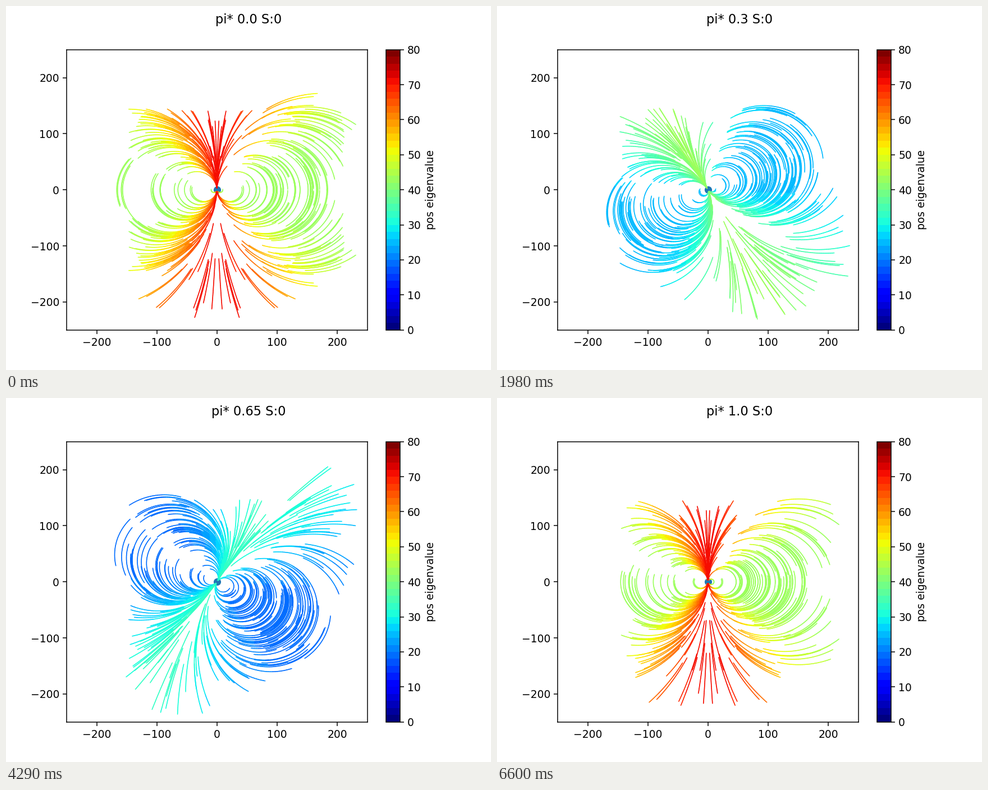
Write a matplotlib script that moves like this. It is 864 by 648 pixels and loops after 6.93 s.

```python
import numpy as np
import matplotlib.pyplot as plt
from matplotlib.animation import FuncAnimation
from matplotlib.cm import ScalarMappable
from matplotlib.collections import LineCollection
from matplotlib.colors import Normalize

FRAMES, INTERVAL = 21, 330
SEEDS = 92           # per quadrant
STEPS, STRIDE = 90, 3
CORE = 4.0           # lines stop this close to the origin


def tilt(pos, turn):
    """Angle of the field axis from the vertical at each position."""
    if abs(turn - 0.5) < 1e-9:
        above = pos[:, 1] > pos[:, 0]
        return np.where(above, np.pi / 4, -np.pi / 4)
    return np.full(len(pos), (turn if turn < 0.5 else turn - 1) * np.pi / 2)


def direction(pos, turn):
    """Unit vector of the dipole-like line field."""
    theta = np.arctan2(pos[:, 1], pos[:, 0])
    rel = theta - tilt(pos, turn)
    s, c = np.sin(rel), np.cos(rel)
    radial, around = -(1 + 0.2 * s**4) * s, c
    ct, st = np.cos(theta), np.sin(theta)
    v = np.stack([radial * ct - around * st, radial * st + around * ct], axis=1)
    return v / np.linalg.norm(v, axis=1, keepdims=True)


def aligned(v, ref):
    return np.where((v * ref).sum(axis=1, keepdims=True) < 0, -v, v)


def eigenvalue(pos, turn):
    s = np.sin(np.arctan2(pos[:, 1], pos[:, 0]) - tilt(pos, turn))
    return abs(np.cos(turn * np.pi)) * (42.5 + 29.5 * s**4)


def seeds(i):
    rng = np.random.default_rng(100 + i)
    quad = rng.uniform(1, 147, (SEEDS, 2))
    return np.concatenate([quad * (sx, sy) for sx in (1, -1) for sy in (1, -1)])


def trace(i):
    """Segments of all lines and the value at each one."""
    turn = i / (FRAMES - 1)
    pos = seeds(i)
    v = direction(pos, turn)
    # steep lines start downwards, shallow ones to the right
    steep = np.abs(v[:, 1]) > np.abs(v[:, 0])
    flip = np.where(steep, v[:, 1] > 0, v[:, 0] < 0)
    v[flip] *= -1

    path = [pos]
    live = np.ones((len(pos), 1), bool)
    for step in range(1, STEPS + 1):
        v = aligned(direction(pos, turn), v)
        mid = aligned(direction(pos + v / 2, turn), v)
        live &= np.hypot(pos[:, 0], pos[:, 1])[:, None] > CORE
        pos = np.where(live, pos + mid, pos)
        if step % STRIDE == 0:
            path.append(pos)

    path = np.array(path)
    segs = np.stack([path[:-1], path[1:]], axis=2)
    segs = segs.transpose(1, 0, 2, 3).reshape(-1, 2, 2)
    segs = segs[np.abs(segs[:, 1] - segs[:, 0]).sum(axis=1) > 0]
    return segs, eigenvalue(segs.mean(axis=1), turn)


fig, ax = plt.subplots(figsize=(6.4, 4.8), dpi=135)
cmap = plt.get_cmap("jet", 40)
norm = Normalize(0, 80)
fig.colorbar(ScalarMappable(norm, cmap), ax=ax, label="pos eigenvalue")
ax.set(xlim=(-250, 250), ylim=(-250, 250))
ax.set_xticks(range(-200, 201, 100))
ax.set_yticks(range(-200, 201, 100))

ax.scatter([0], [0], color="C0", zorder=1)
lines = LineCollection([], cmap=cmap, norm=norm, linewidths=0.85,
                       capstyle="round", zorder=2)
ax.add_collection(lines, autolim=False)
title = fig.suptitle("")


def update(i):
    segs, values = trace(i)
    lines.set_segments(segs)
    lines.set_array(values)
    title.set_text(f"pi* {round(i / (FRAMES - 1), 2)} S:0")
    return lines, title


anim = FuncAnimation(fig, update, frames=FRAMES, interval=INTERVAL,
                     init_func=lambda: update(0), repeat=True, repeat_delay=0)
plt.show()
```
